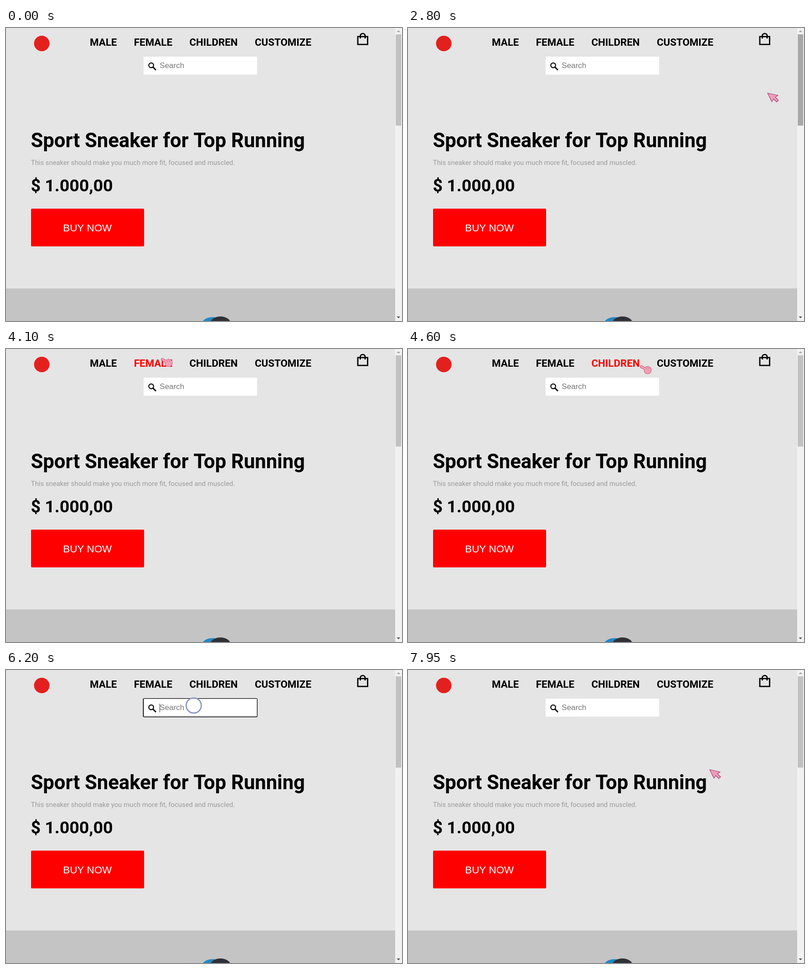
An HTML page with a canvas for the animation above (8000 ms loop, 869 px wide and 644 px high).

```html
<!DOCTYPE html>
<html lang="en">
<head>
<meta charset="utf-8">
<title>Sneaker shop</title>
<style>
html, body { margin: 0; width: 100%; height: 100%; overflow: hidden; background: #e5e5e5; }
canvas { display: block; }
</style>
</head>
<body>
<canvas id="stage" width="869" height="644"></canvas>
<script>
const ctx = document.getElementById('stage').getContext('2d');
const LOOP = 8000, STEP = 50;
const ROBOTO = 'Roboto, sans-serif';
const ARIAL = '"Liberation Sans", Arial, sans-serif';
const NAV_FONT = '600 22.3px ' + ROBOTO;
const NAV_GAP = 37.5;

const stop = (x, y) => ({ x, y });
const ENTRY = stop(788, 142), LEFT = stop(177, 64), FEMALE_END = stop(375, 31);
const CUSTOMIZE = stop(648, 24), BAG = stop(794, 18), FIELD = stop(439, 75);
const RETURN = stop(615, 93), BLUR = stop(649, 91), REST = stop(661, 218);

// The pointer waits at the end of each leg until the next one starts.
const LEGS = [
  { start: 2800, end: 3300, from: ENTRY, to: LEFT, arc: -85 },
  { start: 3500, end: 4300, from: LEFT, to: FEMALE_END, arc: -30 },
  { start: 4400, end: 4900, from: FEMALE_END, to: CUSTOMIZE, arc: 7 },
  { start: 5100, end: 5400, from: CUSTOMIZE, to: BAG, arc: -5 },
  { start: 5400, end: 5900, from: BAG, to: FIELD, arc: 0 },
  { start: 6900, end: 7000, from: RETURN, to: BLUR, arc: 0 },
  { start: 7400, end: 7950, from: BLUR, to: REST, arc: 0 }
];
const HIDDEN = { from: 5950, until: 6900 };
const CLICKS = [{ start: 6100, x: 412, y: 78 }, { start: 7150, ...BLUR }];

const nav = layoutNav(['MALE', 'FEMALE', 'CHILDREN', 'CUSTOMIZE'], 184);

function layoutNav(labels, left) {
  ctx.font = NAV_FONT;
  return labels.map(label => {
    const item = { label, x: left, right: left + ctx.measureText(label).width };
    left = item.right + NAV_GAP;
    return item;
  });
}

function pointerAt(t) {
  const leg = LEGS.findLast(l => t >= l.start);
  if (!leg || (t >= HIDDEN.from && t < HIDDEN.until)) return null;
  const p = Math.min(1, (t - leg.start) / (leg.end - leg.start));
  const k = p * (1.38 - 0.38 * p);
  const { from, to, arc } = leg;
  return stop(
    Math.round(from.x + (to.x - from.x) * k),
    Math.round(from.y + (to.y - from.y) * k + arc * 4 * k * (1 - k))
  );
}

function rect(x, y, w, h, color, radius = 0) {
  ctx.fillStyle = color;
  ctx.beginPath();
  ctx.roundRect(x, y, w, h, radius);
  ctx.fill();
}

function ellipse(x, y, rx, ry, color) {
  ctx.fillStyle = color;
  ctx.beginPath();
  ctx.ellipse(x, y, rx, ry, 0, 0, Math.PI * 2);
  ctx.fill();
}

function ring(x, y, r, color, width) {
  ctx.strokeStyle = color;
  ctx.lineWidth = width;
  ctx.beginPath();
  ctx.arc(x, y, r, 0, Math.PI * 2);
  ctx.stroke();
}

function text(str, x, y, font, color, align = 'left') {
  ctx.font = font;
  ctx.fillStyle = color;
  ctx.textAlign = align;
  ctx.fillText(str, x, y);
}

function fillPath(d, color) {
  ctx.fillStyle = color;
  ctx.fill(new Path2D(d));
}

function strokePath(d, color, width) {
  ctx.strokeStyle = color;
  ctx.lineWidth = width;
  ctx.stroke(new Path2D(d));
}

function drawHeader(hovered) {
  ellipse(78.5, 34, 17, 17, '#e4201f');
  for (const item of nav) {
    text(item.label, item.x, 38.5, NAV_FONT, item === hovered ? '#f00' : '#000');
  }
  strokePath('M772 18.8 H793.6 V36.2 H772 Z M777.6 23 V17 a5.2 4.8 0 0 1 10.4 0 V23', '#000', 2.8);
}

function drawSearch(focused, caret) {
  if (focused) rect(300.5, 62, 251.5, 41.7, '#000', 3);
  const inset = focused ? 0.3 : 0;
  rect(302 + inset, 63 + inset, 249 - 2 * inset, 39.5 - 2 * inset, '#fff', 1);
  ring(318.6, 82, 5.2, '#000', 2.2);
  strokePath('M322.6 86 L329 92.6', '#000', 2.9);
  text('Search', 337.3, 88.2, '17px ' + ARIAL, '#757575');
  if (caret) rect(337, 74, 1, 19, '#333');
}

function drawHero() {
  text('Sport Sneaker for Top Running', 54.5, 261.5, '600 43.6px ' + ROBOTO, '#000');
  text('This sneaker should make you much more fit, focused and muscled.', 54.8, 301,
    '14.85px ' + ROBOTO, '#9b9b9b');
  text('$ 1.000,00', 54.5, 358.7, '600 37.5px ' + ROBOTO, '#000');
  rect(55, 397, 248, 83, '#f00', 2);
  text('BUY NOW', 178.7, 446.8, '22.4px ' + ARIAL, '#fff', 'center');
}

function drawNextSection() {
  rect(0, 572.5, 854, 72, '#c4c4c4');
  ellipse(454, 650, 24, 14.5, '#2487c3');
  ellipse(470.5, 650, 23, 16, '#303136');
}

function drawScrollbar(active) {
  rect(854, 0, 15, 644, '#f1f1f1');
  rect(855.3, 14, 12, 200.5, active ? '#a8a8a8' : '#c1c1c1');
  fillPath('M857.5 9 l3.8 -4 l3.8 4 Z', '#a3a3a3');
  fillPath('M857.5 634 l3.8 4 l3.8 -4 Z', '#505050');
}

function drawArrow() {
  const shape = 'M1 1 L24 6 L18 10 L25 17 L21 20.5 L14 14 L10.5 20 Z';
  fillPath(shape, '#f09dba');
  strokePath(shape, '#a83a76', 1.2);
}

function drawHand() {
  ctx.lineCap = 'round';
  for (const [color, grow] of [['#cc5c88', 1], ['#f59fb3', 0]]) {
    strokePath('M3 4 L14 10', color, 4 + 2 * grow);
    ellipse(17, 11.5, 7.5 + grow, 7.8 + grow, color);
  }
  strokePath('M13 6 l3 4 M17 5 l3 4', '#d86889', 1);
}

function drawPointer({ x, y }, isHand) {
  ctx.save();
  ctx.translate(x, y);
  ctx.lineJoin = 'round';
  if (isHand) drawHand();
  else drawArrow();
  ctx.restore();
}

function drawClick(t, { start, x, y }) {
  const p = (t - start) / 450;
  if (p < 0 || p >= 1) return;
  const r = 13 + 9 * (1 - (1 - p) ** 2);
  ctx.save();
  ctx.globalAlpha = Math.min(1, 1.3 * (1 - p));
  ellipse(x, y, r, r, 'rgba(255,255,255,0.45)');
  ring(x, y, r, '#8690c4', 2.6);
  ctx.restore();
}

function draw(t) {
  const pointer = pointerAt(t);
  const inRow = pointer && pointer.y >= 14 && pointer.y <= 46;
  const over = (left, right) => inRow && pointer.x >= left && pointer.x <= right;
  const hovered = nav.find(item => over(item.x - 15, item.right + 15));
  const focused = t >= 6150 && t < 7250;
  const caret = focused && (t < 6600 || t >= 7150);

  rect(0, 0, 869, 644, '#e5e5e5');
  drawHeader(hovered);
  drawSearch(focused, caret);
  drawHero();
  drawNextSection();
  drawScrollbar(t >= LEGS[0].start && t < LEGS[0].start + STEP);
  CLICKS.forEach(click => drawClick(t, click));
  if (pointer) drawPointer(pointer, hovered || over(766, 798));
}

const began = performance.now();
function tick() {
  const t = (performance.now() - began) % LOOP;
  draw(Math.floor(t / STEP) * STEP);
  requestAnimationFrame(tick);
}
tick();
</script>
</body>
</html>
```
